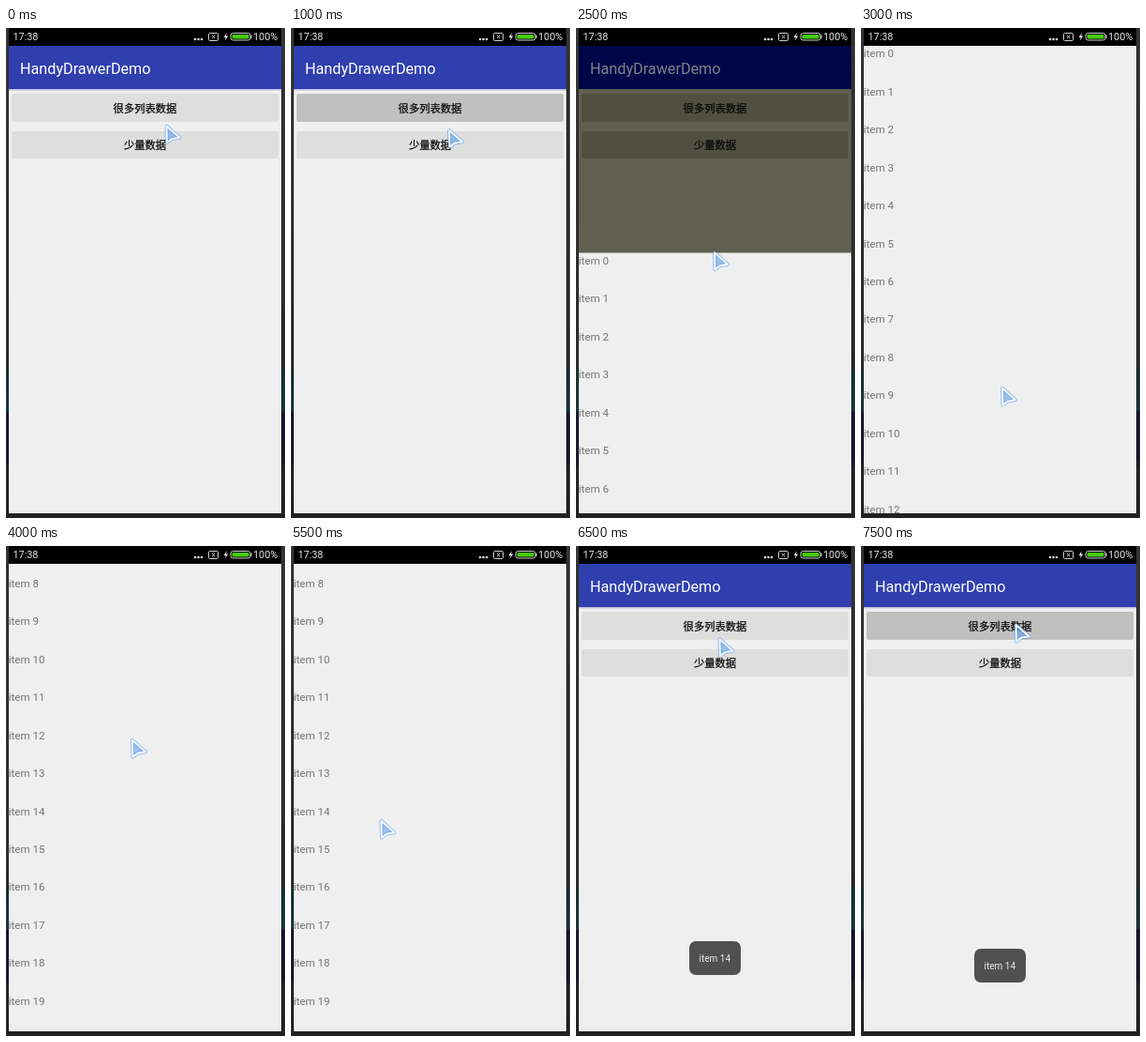
Animation, 298 px wide and 522 px high, one loop 8 s. Source, as an HTML page:

```html
<!DOCTYPE html>
<html lang="zh-CN">
<head>
<meta charset="utf-8">
<style>
  html, body { margin: 0; width: 100%; height: 100%; overflow: hidden; background: #222; }
  svg { display: block; width: 298px; height: 522px; font-family: Roboto, sans-serif; }
  .status { font-size: 10.8px; fill: #e4e4e4; }
  .label { font: 500 11.3px "Noto Sans CJK SC", "Noto Sans CJK", sans-serif; text-anchor: middle; fill: #080808; stroke: #080808; stroke-width: .25; }
  #list { font-size: 11.6px; fill: #757575; }
</style>
</head>
<body>
<svg viewBox="0 0 298 522">
  <defs>
    <linearGradient id="edge" x2="0" y2="1">
      <stop offset="0" stop-color="#333"/>
      <stop offset=".695" stop-color="#2a2a2c"/>
      <stop offset=".697" stop-color="#15302f"/>
      <stop offset=".78" stop-color="#1a3638"/>
      <stop offset=".785" stop-color="#1a1630"/>
      <stop offset=".88" stop-color="#1b1628"/>
      <stop offset=".9" stop-color="#262326"/>
      <stop offset="1" stop-color="#222"/>
    </linearGradient>
    <clipPath id="screen"><rect x="3" y="19" width="291" height="498"/></clipPath>
    <path id="arrow" d="M2 2L16 14.2L8.3 15.4L2.4 19.6Z" stroke-linejoin="round"/>
  </defs>

  <rect width="298" height="522" fill="url(#edge)"/>
  <rect x="3" width="291" height="20"/>

  <g clip-path="url(#screen)">
    <rect id="page" x="3" y="19" width="291" height="498"/>
    <rect id="barShadow" x="3" y="65" width="291" height="1.5" fill="#7078c0" opacity=".4"/>
    <rect id="bar" x="3" y="19" width="291" height="46"/>
    <text id="title" x="15" y="48.5" font-size="16.2">HandyDrawerDemo</text>
    <g id="buttons">
      <rect id="many" x="6" y="70" width="285" height="30" rx="2"/>
      <rect id="few" x="6" y="110" width="285" height="29" rx="2"/>
    </g>
    <text class="label" x="148.5" y="89.6">很多列表数据</text>
    <text class="label" x="148.5" y="129.4">少量数据</text>
    <g id="sheet">
      <rect x="3" width="291" height="520" fill="#efefef"/>
      <g id="list"></g>
    </g>
    <g id="toast">
      <rect x="121" width="55" height="36" rx="7" fill="#505050"/>
      <text x="148.3" y="21.8" font-size="10" fill="#ececec" text-anchor="middle">item 14</text>
    </g>
  </g>

  <rect x="3" width="291" height="19"/>
  <g class="status">
    <text x="7.5" y="13.2">17:38</text>
    <text x="264" y="13.2">100%</text>
    <circle cx="202" cy="12" r="1.3"/>
    <circle cx="205.5" cy="12" r="1.3"/>
    <circle cx="209" cy="12" r="1.3"/>
    <path d="M236 5L232.5 10H234.7L233.8 13.5L237.3 8.5H235Z"/>
    <rect x="261.3" y="7.5" width="1.2" height="3.5"/>
  </g>
  <g fill="none" stroke="#d0d0d0">
    <rect x="216.5" y="5.5" width="10" height="8" rx="1"/>
    <path d="M220 8L223 11M223 8L220 11"/>
    <rect x="240" y="5.5" width="21" height="7.5" rx="2.5"/>
  </g>
  <rect x="241.5" y="7" width="18" height="4.5" rx="1.2" fill="#4c0"/>

  <g id="cursor">
    <use href="#arrow" fill="none" stroke="#4a90e8" stroke-opacity=".5" stroke-width="4"/>
    <use href="#arrow" fill="#4a94e8" fill-opacity=".5" stroke="#f0f7ff" stroke-width="2"/>
  </g>
</svg>

<script>
const $ = id => document.getElementById(id);
const STEP = 500, ROW = 40.44, TOP = 19, END = 311;

// Colours: page, button, bar, title
const light = ['#efefef', '#dedede', '#2f3fae', '#fff'];
const teal = ['#536260', '#445350', '#000542', '#7c848a'];
const olive = ['#606050', '#505040', '#000548', '#7c848a'];
const fading = ['#a8a8a0', '#989890', '#18227c', '#c0c2c6'];

const steps = [
  { at: [169.5, 102.5] },
  { at: [165, 85] },
  { at: [167, 107], pressed: true },
  { at: [167.5, 179], colors: teal, top: 310 },
  { at: [153, 371], colors: teal, top: 310 },
  { at: [146, 237.5], colors: olive, top: 239.5 },
  { at: [149, 382], top: TOP },
  { at: [120, 99], top: TOP, scroll: END },
  { at: [133, 205], top: TOP, scroll: END },
  { at: [93, 371], top: TOP, scroll: END },
  { at: [93.5, 213], top: TOP, scroll: END },
  { at: [94.5, 291], top: TOP, scroll: END },
  { at: [94.5, 291], colors: fading, top: 69, scroll: END, alpha: .5 },
  { at: [151.5, 97.5], toast: 421 },
  { at: [162.5, 82], toast: 429 },
  { at: [163.5, 82], toast: 429, pressed: true }
];

const rows = Array.from({ length: 20 }, (_, i) => {
  const row = document.createElementNS('http://www.w3.org/2000/svg', 'text');
  row.textContent = 'item ' + i;
  row.setAttribute('x', 2.7);
  return $('list').appendChild(row);
});

const move = (id, x, y) => $(id).setAttribute('transform', `translate(${x} ${y})`);
const fill = (id, color) => $(id).setAttribute('fill', color);
const show = (id, on) => $(id).style.display = on ? '' : 'none';

function draw({ at, colors = light, top, scroll = 0, alpha = 1, toast, pressed }) {
  const [page, button, bar, title] = colors;
  fill('page', page);
  fill('buttons', button);
  fill('many', pressed ? '#c0c0c0' : button);
  fill('bar', bar);
  fill('title', title);
  show('barShadow', colors === light);

  show('sheet', top !== undefined);
  $('sheet').style.opacity = alpha;
  move('sheet', 0, top || 0);
  rows.forEach((row, i) => {
    const y = 12.4 + i * ROW - scroll;
    row.setAttribute('y', y);
    row.style.display = y < 0 ? 'none' : '';
  });

  show('toast', toast);
  move('toast', 0, toast || 0);
  move('cursor', ...at);
}

const start = performance.now();
let shown = -1;
function tick() {
  const index = Math.floor((performance.now() - start) / STEP) % steps.length;
  if (index !== shown) draw(steps[shown = index]);
  requestAnimationFrame(tick);
}
tick();
</script>
</body>
</html>
```
